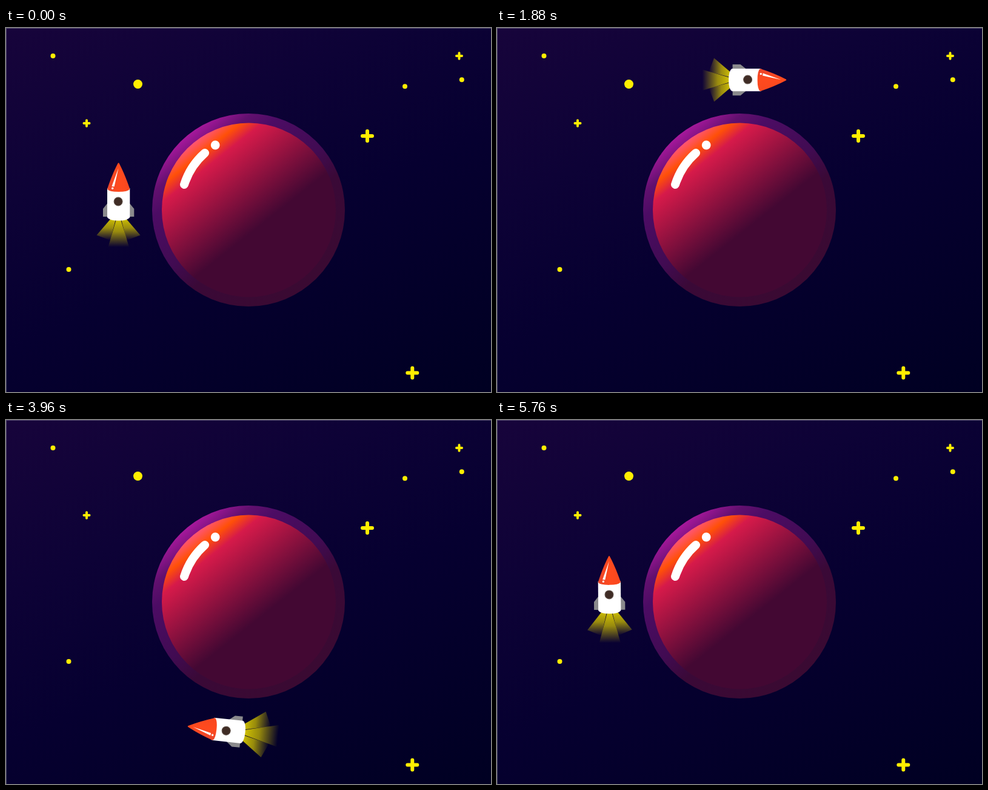
These frames come from a looping animation (800x600 px, 5.8 s). An HTML page:

```html
<!DOCTYPE html>
<html lang="en">
<head>
<meta charset="utf-8">
<title>Rocket in orbit</title>
<style>
  html, body { margin: 0; width: 100%; height: 100%; overflow: hidden; background: #060030; }
  svg { display: block; width: 100%; height: 100%; }
</style>
</head>
<body>
<svg viewBox="0 0 800 600">
  <defs>
    <linearGradient id="sky" gradientUnits="userSpaceOnUse" x1="0" y1="0" x2="370" y2="803">
      <stop offset="0" stop-color="#17043b"/>
      <stop offset=".3" stop-color="#0d0236"/>
      <stop offset=".55" stop-color="#060030"/>
      <stop offset="1" stop-color="#000022"/>
    </linearGradient>
    <linearGradient id="rim" gradientUnits="userSpaceOnUse" x1="301" y1="175" x2="499" y2="425">
      <stop offset="0" stop-color="#a8189c"/>
      <stop offset=".12" stop-color="#62106f"/>
      <stop offset=".22" stop-color="#4c0c64"/>
      <stop offset=".48" stop-color="#410b52"/>
      <stop offset=".64" stop-color="#3a0937"/>
      <stop offset="1" stop-color="#3a0a32"/>
    </linearGradient>
    <linearGradient id="globe" gradientUnits="userSpaceOnUse" x1="311" y1="187" x2="420" y2="325">
      <stop offset="0" stop-color="#ff5578"/>
      <stop offset=".13" stop-color="#ff5008"/>
      <stop offset=".26" stop-color="#d61a4a"/>
      <stop offset="1" stop-color="#430833"/>
    </linearGradient>
    <linearGradient id="nose" gradientUnits="userSpaceOnUse" x1="167" y1="0" x2="204" y2="0">
      <stop offset="0" stop-color="#e8452c"/>
      <stop offset=".5" stop-color="#ff4a1e"/>
      <stop offset="1" stop-color="#f8481f"/>
    </linearGradient>
    <linearGradient id="fire" x1="0" y1="0" x2="0" y2="1">
      <stop offset="0" stop-color="#e0d000" stop-opacity=".95"/>
      <stop offset=".45" stop-color="#d0c000" stop-opacity=".72"/>
      <stop offset="1" stop-color="#c8b800" stop-opacity="0"/>
    </linearGradient>
  </defs>

  <rect width="800" height="600" fill="url(#sky)"/>
  <path d="M0 .5H800M.5 1V600" stroke="#8c88a0" stroke-opacity=".55"/>

  <g fill="#ffee00">
    <circle cx="77.5" cy="46" r="4"/>
    <circle cx="217.5" cy="92.5" r="7.5"/>
    <circle cx="658" cy="96.2" r="4"/>
    <circle cx="751.8" cy="85.3" r="4"/>
    <circle cx="103.5" cy="398" r="4"/>
  </g>
  <g stroke="#ffee00" stroke-linecap="round">
    <path stroke-width="4" d="M128.5 157h9m-4.5-4.8v9.6M743 46h9m-4.5-4.8v9.6"/>
    <path stroke-width="6" d="M588 178h16m-8-8v16M662.3 568.5h16m-8-8v16"/>
  </g>

  <circle cx="400" cy="300" r="159" fill="url(#rim)"/>
  <circle cx="400.5" cy="300" r="143.5" fill="url(#globe)"/>
  <path d="M294 258A116 116 0 0 1 328 206" fill="none" stroke="#fff" stroke-width="14" stroke-linecap="round"/>
  <circle cx="345.2" cy="193" r="7.4" fill="#fff"/>

  <g id="rocket">
    <g id="flames" fill="url(#fire)">
      <path d="M174 -3L181 -1L172 34L149.500 25.500Z"/>
      <path d="M197 -3L190 -1L199 34L221.500 25.500Z"/>
      <path d="M182 -1H189L203 45H168.500Z"/>
    </g>
    <path d="M168 288L160 298V311H168ZM203 288L211.300 298V311H203Z" fill="#8a8a8c"/>
    <path d="M167 264H204.300V312Q201 317.500 185.700 317.500Q170 317.500 167 312Z" fill="#fff"/>
    <path d="M184.600 223Q185.600 221.300 186.600 223Q196 241 204.300 265.500Q201 270 185.700 270Q170 270 167 265.500Q175 241 184.600 223Z" fill="url(#nose)"/>
    <path d="M185.500 231L178.600 261.500L174.500 261Z" fill="#fff"/>
    <circle cx="175.700" cy="264.300" r="1.700" fill="#fff"/>
    <circle cx="185.100" cy="286" r="7" fill="#3f2c25" stroke="#62544d"/>
  </g>
</svg>
<script>
  const LOOP = 5800, STEP = 40, ORBIT = 5760, PULSE = 472;
  const rocket = document.getElementById('rocket');
  const flames = document.getElementById('flames');
  const start = performance.now();

  function draw() {
    const elapsed = (performance.now() - start) % LOOP;
    const t = Math.floor(elapsed / STEP) * STEP;
    const p = t / ORBIT;
    const angle = 359.5 * p * p * (3 - 2 * p);
    const pulse = (1 - Math.cos(2 * Math.PI * t / PULSE)) / 2;
    rocket.setAttribute('transform', `rotate(${angle} 400 300)`);
    // Flames stretch away from the nozzle.
    flames.setAttribute('transform',
      `translate(185.5 316) scale(${1 + .06 * pulse} ${1 + .28 * pulse}) translate(-185.5 0)`);
    requestAnimationFrame(draw);
  }
  draw();
</script>
</body>
</html>
```
